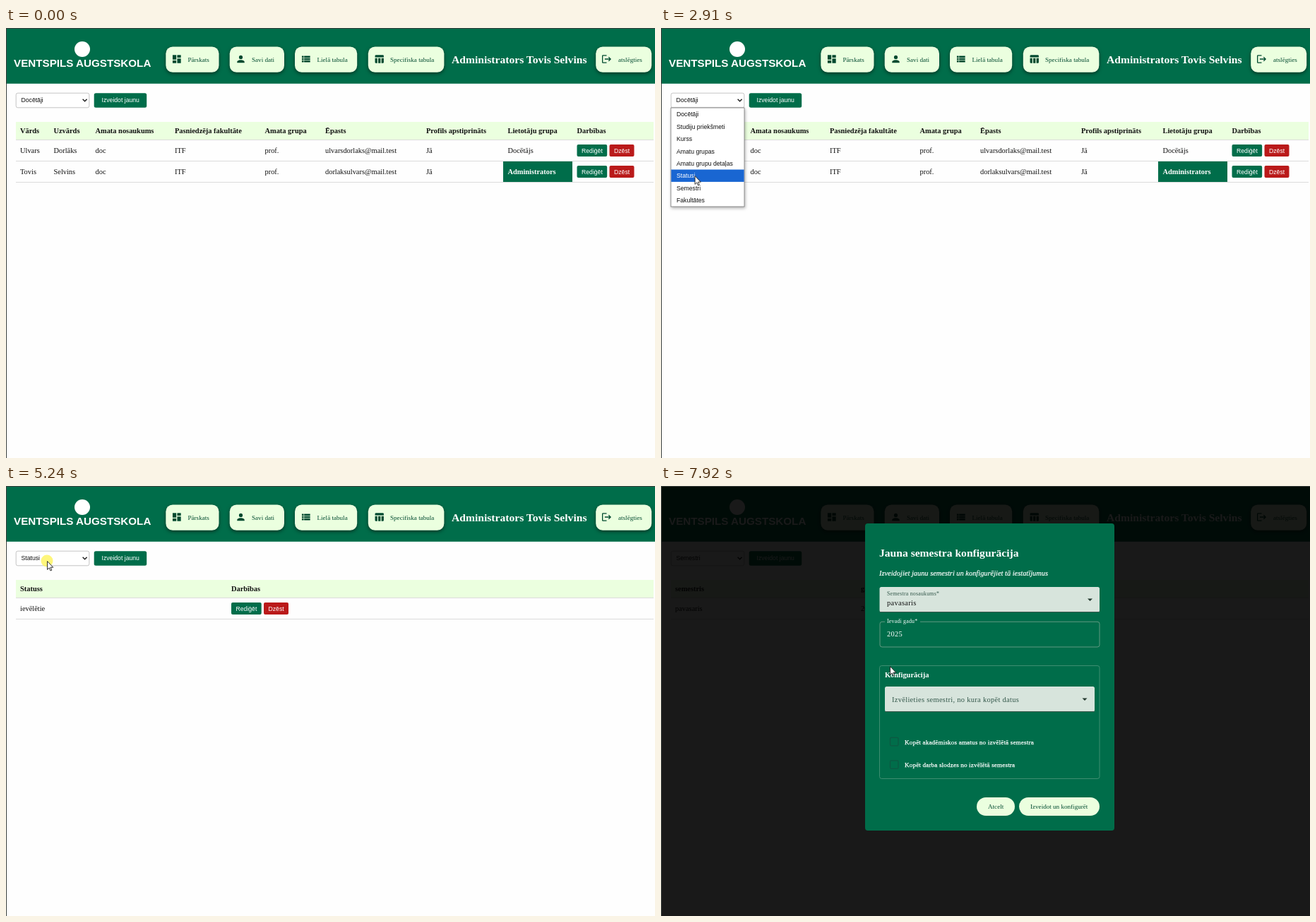
An HTML page for the animation above (8000 ms loop, 919x609 px).

```html
<!DOCTYPE html>
<html lang="lv">
<head>
<meta charset="utf-8">
<title>Administrēšana</title>
<style>
  html, body { margin: 0; width: 100%; height: 100%; overflow: hidden; background: #fefefe; }
  svg { display: block; width: 919px; height: 609px; }
  text { font: 10.4px "Liberation Serif", "Times New Roman", serif; fill: #111; }
  .b { font-weight: bold; }
  .w { fill: #fff; }
  .big { font-size: 15.6px; font-weight: bold; fill: #fff; }
  .nav { font-size: 9.1px; fill: #00492f; }
  .ui { font: 8.67px "Liberation Sans", Arial, sans-serif; }
  .logo { font: bold 15.2px "Liberation Sans", Arial, sans-serif; fill: #fff; }
  .field { letter-spacing: .325px; }
  .label { font-size: 7.8px; letter-spacing: .24px; }
  .muted { fill: #33574a; }
  .note { font-style: italic; fill: #fff; stroke: #fff; stroke-width: .2px; }
  .check { font-size: 9.1px; letter-spacing: .0179em; fill: #fff; stroke: #fff; stroke-width: .25px; }
  .raised { filter: drop-shadow(0 2px 2.5px rgba(0, 0, 0, .5)); }
</style>
</head>
<body>
<svg id="stage" viewBox="0 0 919 609"></svg>
<script>
const GREEN = '#006d4a', PALE = '#ebffdf', RED = '#ba1a1a', GREY_GREEN = '#d7e4dc';
const OPTIONS = ['Docētāji', 'Studiju priekšmeti', 'Kurss', 'Amatu grupas',
  'Amatu grupu detaļas', 'Statusi', 'Semestri', 'Fakultātes'];
const OPTION_TOP = 113.5, OPTION_H = 17.4;

const text = (s, x, y, cls = '', extra = '') =>
  `<text x="${x}" y="${y}" class="${cls}" ${extra}>${s}</text>`;
const rect = (x, y, w, h, fill, r = 0, extra = '') =>
  `<rect x="${x}" y="${y}" width="${w}" height="${h}" fill="${fill}" rx="${r}" ${extra}/>`;
const path = (d, extra = '') => `<path d="${d}" ${extra}/>`;

// Icons are drawn on a 24 unit grid
const ICONS = {
  board: 'M3 13h8V3H3zM3 21h8v-6H3zM13 21h8V11h-8zM13 3v6h8V3z',
  person: 'M12 12a4 4 0 1 0 0-8a4 4 0 0 0 0 8zM12 14c-2.7 0-8 1.3-8 4v2h16v-2c0-2.7-5.3-4-8-4z',
  list: 'M3 14h4v-4H3zM3 19h4v-4H3zM3 9h4V5H3zM8 14h13v-4H8zM8 19h13v-4H8zM8 5v4h13V5z',
  table: 'M10 10h5v11h-5zM17 21h3a2 2 0 0 0 2-2v-9h-5zM20 3H5a2 2 0 0 0-2 2v3h19V5a2 2 0 0 0-2-2zM3 19a2 2 0 0 0 2 2h3V10H3z',
  exit: 'M17 7l-1.4 1.4 2.6 2.6H8v2h10.2l-2.6 2.6L17 17l5-5zM4 5h8V3H4a2 2 0 0 0-2 2v14a2 2 0 0 0 2 2h8v-2H4z'
};

const navButton = (x, w, icon, iconX, label, labelX) =>
  rect(x, 26.5, w, 36.3, PALE, 9.75, 'class="raised"') +
  path(ICONS[icon], `fill="#00492f" transform="translate(${iconX} 36.2) scale(.65)"`) +
  text(label, labelX, 47.6, 'nav');

const header = () =>
  rect(0, 0, 919, 78.8, GREEN) +
  '<circle cx="108" cy="30" r="11" fill="#fff"/>' +
  text('VENTSPILS AUGSTSKOLA', 11, 55, 'logo') +
  navButton(226.3, 75.2, 'board', 234, 'Pārskats', 257.5) +
  navButton(316.7, 77.3, 'person', 324.7, 'Savi dati', 348) +
  navButton(409, 88.2, 'list', 417, 'Lielā tabula', 440.5) +
  navButton(512.8, 107.6, 'table', 520.6, 'Specifiska tabula', 544) +
  text('Administrators Tovis Selvins', 631, 50, 'big') +
  navButton(835.2, 79, 'exit', 842.7, 'atslēgties', 867);

const actions = (x, y) =>
  rect(x, y, 42.7, 17, GREEN, 2) + text('Rediģēt', x + 6.5, y + 11.9, 'ui w') +
  rect(x + 46, y, 35, 17, RED, 2) + text('Dzēst', x + 52.5, y + 11.9, 'ui w');

function table(id, columns, heads, rows) {
  const last = columns[columns.length - 1];
  let out = rect(14, 133, 903, 25, PALE) + rect(14, 158, 903, 1, '#dcdcdc');
  heads.forEach((h, i) => out += text(h, columns[i], 149, 'b'));
  rows.forEach((row, r) => {
    const y = 30 * r;
    row.forEach((cell, i) => {
      const admin = cell === 'Administrators';
      if (admin) out += rect(704, y + 159, 98, 29.5, GREEN);
      out += text(cell, columns[i], y + 177, admin ? 'b w' : '');
    });
    out += actions(last, y + 165) + rect(14, y + 188, 903, 1, '#dcdcdc');
  });
  return `<g id="${id}">${out}</g>`;
}

const tables = () =>
  table('docenti', [20, 67.5, 126.5, 239, 366.5, 452, 595, 710.5, 808.5],
    ['Vārds', 'Uzvārds', 'Amata nosaukums', 'Pasniedzēja fakultāte', 'Amata grupa',
      'Ēpasts', 'Profils apstiprināts', 'Lietotāju grupa', 'Darbības'],
    [['Ulvars', 'Dorlāks', 'doc', 'ITF', 'prof.', 'ulvarsdorlaks@mail.test', 'Jā', 'Docētājs'],
      ['Tovis', 'Selvins', 'doc', 'ITF', 'prof.', 'dorlaksulvars@mail.test', 'Jā', 'Administrators']]) +
  table('semestri', [20, 283, 448], ['semestris', 'gads', 'Darbības'], [['pavasaris', '2024']]) +
  table('statusi', [20, 319], ['Statuss', 'Darbības'], [['ievēlētie']]);

const toolbar = () =>
  rect(14.2, 92.2, 103.6, 20.6, '#fff', 2.5, 'id="box"') +
  text('', 21.5, 105.4, 'ui', 'id="chosen"') +
  path('M108.6 100.8l3 3 3-3', 'fill="none" stroke="#222" stroke-width="1.5"') +
  rect(124.7, 92.3, 74.5, 20.4, GREEN, 2.5) + text('Izveidot jaunu', 135.5, 105.4, 'ui w');

const menu = () => '<g id="menu">' +
  rect(14, 113, 104, 140, '#fff', 0,
    'stroke="#767676" stroke-width=".8" style="filter:drop-shadow(1px 2px 2px rgba(0,0,0,.3))"') +
  rect(14.4, 0, 103.2, OPTION_H, '#1966d2', 0, 'id="hover"') +
  OPTIONS.map((o, i) => text(o, 22, OPTION_TOP + OPTION_H * i + 11.9, 'ui option')).join('') + '</g>';

const selectField = (x, y, w, arrowX) =>
  rect(x, y, w, 35.5, GREY_GREEN, 2.5) + rect(x, y + 35, w, 1, '#3c5a4e') +
  path(`M${arrowX} ${y + 16.6}h7l-3.5 3.5z`, 'fill="#24382f"');
const checkbox = (y, label) =>
  rect(324.5, y, 11.5, 11.5, 'none', 1.5, 'stroke="#0d5842" stroke-width="1.2"') +
  text(label, 345, y + 9.3, 'check');
const pill = (x, w, label, labelX) =>
  rect(x, 441, w, 26, PALE, 13) + text(label, labelX, 457, 'nav');

const dialog = () => '<g id="dialog">' +
  rect(289, 53, 353, 435, GREEN, 4) +
  text('Jauna semestra konfigurācija', 309, 100.3, 'big') +
  text('Izveidojiet jaunu semestri un konfigurējiet tā iestatījumus', 309, 127.3, 'note') +
  selectField(309.5, 143, 311.5, 604) +
  text('Semestra nosaukums*', 320, 155.3, 'label muted') + text('pavasaris', 320, 169, 'field') +
  path('M317 192.3H313a3 3 0 0 0-3 3V225a3 3 0 0 0 3 3H618a3 3 0 0 0 3-3V195.3a3 3 0 0 0-3-3H367',
    'fill="none" stroke="#6b9d86" stroke-width=".9"') +
  text('Ievadi gadu*', 320, 194.3, 'label w') + text('2025', 320, 213, 'field w') +
  rect(309.5, 254.5, 311.5, 160, 'none', 3, 'stroke="#4f977c" stroke-width=".8"') +
  text('Konfigurācija', 317, 270.7, 'b w') +
  selectField(317, 284, 297, 596.5) +
  text('Izvēlieties semestri, no kura kopēt datus', 327, 306, 'field muted') +
  checkbox(356.3, 'Kopēt akadēmiskos amatus no izvēlētā semestra') +
  checkbox(388.8, 'Kopēt darba slodzes no izvēlētā semestra') +
  pill(447, 54, 'Atcelt', 463) + pill(507, 114, 'Izveidot un konfigurēt', 523) + '</g>';

const stage = document.getElementById('stage');
stage.innerHTML = rect(0, 0, 919, 609, '#fefefe') + header() + tables() + toolbar() + menu() +
  rect(0, 0, 919, 609, '#000', 0, 'id="shade"') + dialog() +
  path('M0 0H919V1H1V609H0z', 'fill="#3a3f3d"') +
  '<circle id="ring" r="8.5" fill="#fdf34f" opacity=".75"/>' +
  path('M.5 .6V12.4L3.2 9.9 5 14 6.800 13.2 5 9.2H8.800Z',
    'id="cursor" fill="#fff" stroke="#1c1c1c" stroke-width=".9"');

const $ = id => document.getElementById(id);
const show = (id, on) => $(id).setAttribute('visibility', on ? 'visible' : 'hidden');
const within = (t, spans) => spans.some(([a, b]) => t >= a && t < b);
const clamp = (v, a, b) => Math.min(b, Math.max(a, v));
const ease = k => k * k * (3 - 2 * k);

// Cursor route: time, x, y
const ROUTE = [[790, 690, 609], [1150, 640, 330], [1620, 498, 30], [1900, 46, 104], [2060, 46, 104],
  [2170, 43, 129], [2440, 43, 132], [3130, 49, 233], [3670, 49, 233], [4010, 61, 104],
  [4420, 61, 104], [4800, 62, 209], [5010, 62, 209], [5240, 58, 106], [5310, 58, 106],
  [5660, 81, 226], [6200, 81, 226], [6450, 100, 260], [7020, 163, 99], [7240, 163, 99],
  [7510, 252, 213], [7920, 324, 255], [8000, 324, 255]];
const CLICKS = [[1910, 2060], [3200, 3340], [4280, 4420], [4870, 5010], [5200, 5310], [5860, 6000], [7020, 7150]];
const OPEN = [[1990, 3270], [4330, 4940], [5310, 5930]];
const FOCUS = [[3270, 4280], [4940, 5200], [5930, 7020]];

function cursorAt(t) {
  const i = clamp(ROUTE.findIndex(p => p[0] > t), 1, ROUTE.length - 1);
  const [t0, x0, y0] = ROUTE[i - 1], [t1, x1, y1] = ROUTE[i];
  const k = ease(clamp((t - t0) / (t1 - t0), 0, 1));
  return [x0 + (x1 - x0) * k, y0 + (y1 - y0) * k];
}

function draw(t) {
  const [x, y] = cursorAt(t);
  const chosen = t < 3270 ? 0 : t >= 4940 && t < 5930 ? 5 : 6;
  show('docenti', chosen === 0);
  show('statusi', chosen === 5);
  show('semestri', chosen === 6);
  $('chosen').textContent = OPTIONS[chosen];

  const focus = within(t, FOCUS);
  $('box').setAttribute('stroke', focus ? '#101010' : '#c4c4c4');
  $('box').setAttribute('stroke-width', focus ? 1.7 : 1);

  show('menu', within(t, OPEN));
  const hover = y < OPTION_TOP ? chosen : clamp(Math.floor((y - OPTION_TOP) / OPTION_H), 0, 7);
  $('hover').setAttribute('y', OPTION_TOP + hover * OPTION_H);
  document.querySelectorAll('.option').forEach((o, i) => o.classList.toggle('w', i === hover));

  const p = ease(clamp((t - 7220) / 200, 0, 1)), s = .8 + .2 * p;
  $('shade').setAttribute('opacity', .9 * p);
  $('dialog').setAttribute('opacity', p);
  $('dialog').setAttribute('transform', `translate(465.5 270.5) scale(${s}) translate(-465.5 -270.5)`);

  show('ring', within(t, CLICKS));
  show('cursor', t >= 790);
  for (const id of ['ring', 'cursor']) $(id).setAttribute('transform', `translate(${x} ${y})`);
}

const start = performance.now();
function tick() {
  draw((performance.now() - start) % 8000);
  requestAnimationFrame(tick);
}
tick();
</script>
</body>
</html>
```
